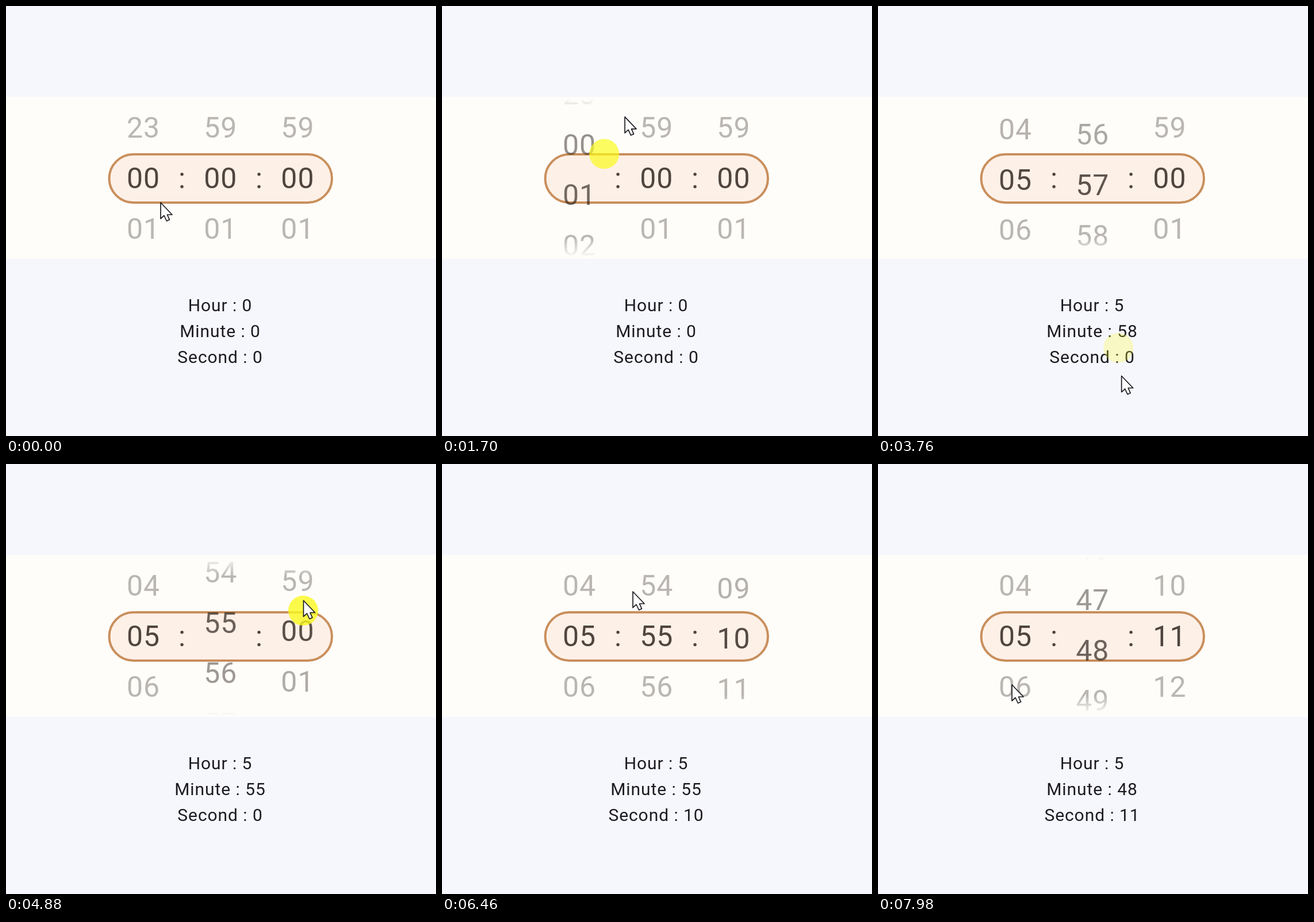
An HTML page for the animation above (8 s loop, 748 by 748 pixels).

```html
<!DOCTYPE html>
<html lang="en">
<head>
<meta charset="utf-8">
<title>Time picker</title>
<style>
  html, body { margin: 0; width: 100%; height: 100%; overflow: hidden; background: #f6f7fc; }
  svg { display: block; width: 100vw; height: 100vh; }
  text { font-family: Roboto, sans-serif; text-anchor: middle; }
  .digits { font-size: 50px; letter-spacing: .94px; fill: #251b15; }
  .labels { font-size: 30px; letter-spacing: .94px; fill: #1c1b20; }
</style>
</head>
<body>
<svg viewBox="0 0 748 748">
  <defs>
    <linearGradient id="fade" gradientUnits="userSpaceOnUse" x1="0" y1="161" x2="0" y2="437">
      <stop offset="0" stop-color="#000"/>
      <stop offset=".125" stop-color="#fff"/>
      <stop offset=".875" stop-color="#fff"/>
      <stop offset="1" stop-color="#000"/>
    </linearGradient>
    <mask id="edges" maskUnits="userSpaceOnUse" x="0" y="158" width="748" height="282">
      <rect y="158" width="748" height="282" fill="url(#fade)"/>
    </mask>
  </defs>
  <rect width="748" height="748" fill="#f6f7fc"/>
  <rect y="158" width="748" height="282" fill="#fefdfa"/>
  <rect x="179.5" y="258" width="387.5" height="84" rx="42" fill="#fdf0e7" stroke="#c98f5c" stroke-width="4"/>
  <g class="digits">
    <g id="wheels" mask="url(#edges)"></g>
    <text x="306.5" y="317" opacity=".8">:</text>
    <text x="440.5" y="317" opacity=".8">:</text>
  </g>
  <g id="labels" class="labels"></g>
  <circle id="touch" r="26" fill="#fbf920"/>
  <path id="cursor" d="M0 0V28L6 22.5L10.5 32L15.5 29.8L11.5 21H20Z"
        fill="#fff" stroke="#1c1c20" stroke-width="1.7" stroke-linejoin="round"/>
</svg>
<script>
const LOOP = 8000, ROW = 87.7, BASELINE = 317;
const SLOP = 50;         // delay before a drag moves the wheel
const FLING = 1070;      // time a wheel takes to come to rest
const LABEL_LAG = 130, TOUCH_LAG = 60, TOUCH_FADE = 120;
const LIFT = .62;        // part of the stroke after which the finger lifts

const columns = ['Hour', 'Minute', 'Second'].map((name, i) => ({
  name, x: 239 + i * 134.2, labelY: 531 + i * 45.2, size: i ? 60 : 24, first: i === 1 ? 60 : 0
}));

const hover = (at, x, y) => ({ at, ms: 0, from: [x, y], to: [x, y] });
const drag = (name, lands, at, ms, from, to) => ({ name, lands, at, ms, from, to });
const gestures = [
  hover(0, 269, 342),
  drag('Hour', 4, 1588, 160, [265, 272], [332, 172]),
  hover(2500, 319, 175),
  drag('Hour', 5, 2970, 160, [265, 270], [278, 175]),
  drag('Minute', 56, 3283, 640, [385, 215], [431, 725]),
  drag('Minute', 55, 4450, 200, [385, 235], [390, 330]),
  drag('Second', 4, 4822, 500, [517, 244], [530, 75]),
  drag('Second', 10, 5557, 360, [518, 280], [535, 42]),
  hover(6460, 332, 222),
  drag('Second', 11, 6750, 200, [520, 130], [526, 30]),
  drag('Minute', 47, 7340, 400, [372, 190], [385, 610]),
  hover(7980, 233, 384)
];
const drags = gestures.filter(g => g.name);

const clamp = v => Math.min(1, Math.max(0, v));
const wrap = (v, n) => ((v % n) + n) % n;
const smooth = u => u * u * (3 - 2 * u);
const easeOut = u => 1 - (1 - u) ** 3;
const $ = id => document.getElementById(id);

function glide(a, b, start, end, t) {
  const u = smooth(clamp((t - start) / (end - start || 1)));
  return a.map((v, i) => v + (b[i] - v) * u);
}

function pointerAt(t) {
  const i = Math.max(0, gestures.findLastIndex(g => g.at <= t));
  const g = gestures[i], next = gestures[i + 1], end = g.at + g.ms;
  if (t < end || !next) return glide(g.from, g.to, g.at, end, t);
  return glide(g.to, next.from, end, next.at, t);
}

function wheelAt(col, t) {
  return drags.filter(g => g.name === col.name).reduce(
    (value, g) => value + (g.lands - value) * easeOut(clamp((t - g.at - SLOP) / FLING)), col.first);
}

function touchStrength(t) {
  return Math.max(...drags.map(g =>
    t < g.at ? 0 : clamp(1 - (t - g.at - g.ms * LIFT) / TOUCH_FADE)));
}

function addText(parent, x, y) {
  const node = document.createElementNS('http://www.w3.org/2000/svg', 'text');
  node.setAttribute('x', x);
  node.setAttribute('y', y);
  return parent.appendChild(node);
}

function write(node, text) {
  if (node.textContent !== text) node.textContent = text;
}

for (const col of columns) {
  col.rows = Array.from({ length: 5 }, () => addText($('wheels'), col.x, BASELINE));
  col.label = addText($('labels'), 372.5, col.labelY);
}

function drawColumn(col, t) {
  const value = wheelAt(col, t), nearest = Math.round(value);
  col.rows.forEach((row, i) => {
    const index = nearest + i - 2, distance = index - value;
    write(row, String(wrap(index, col.size)).padStart(2, '0'));
    row.setAttribute('y', BASELINE + distance * ROW);
    row.setAttribute('opacity', .8 - .49 * clamp(Math.abs(distance)));
  });
  const shown = wrap(Math.round(wheelAt(col, t - LABEL_LAG)), col.size);
  write(col.label, `${col.name} : ${shown}`);
}

function place(node, [x, y]) {
  node.setAttribute('transform', `translate(${x} ${y})`);
}

function draw(t) {
  columns.forEach(col => drawColumn(col, t));
  place($('cursor'), pointerAt(t));
  const [x, y] = pointerAt(t - TOUCH_LAG);
  place($('touch'), [x, y + 11]);
  $('touch').setAttribute('opacity', .8 * touchStrength(t));
}

const start = performance.now();
function tick() {
  draw((performance.now() - start) % LOOP);
  requestAnimationFrame(tick);
}
tick();
</script>
</body>
</html>
```
